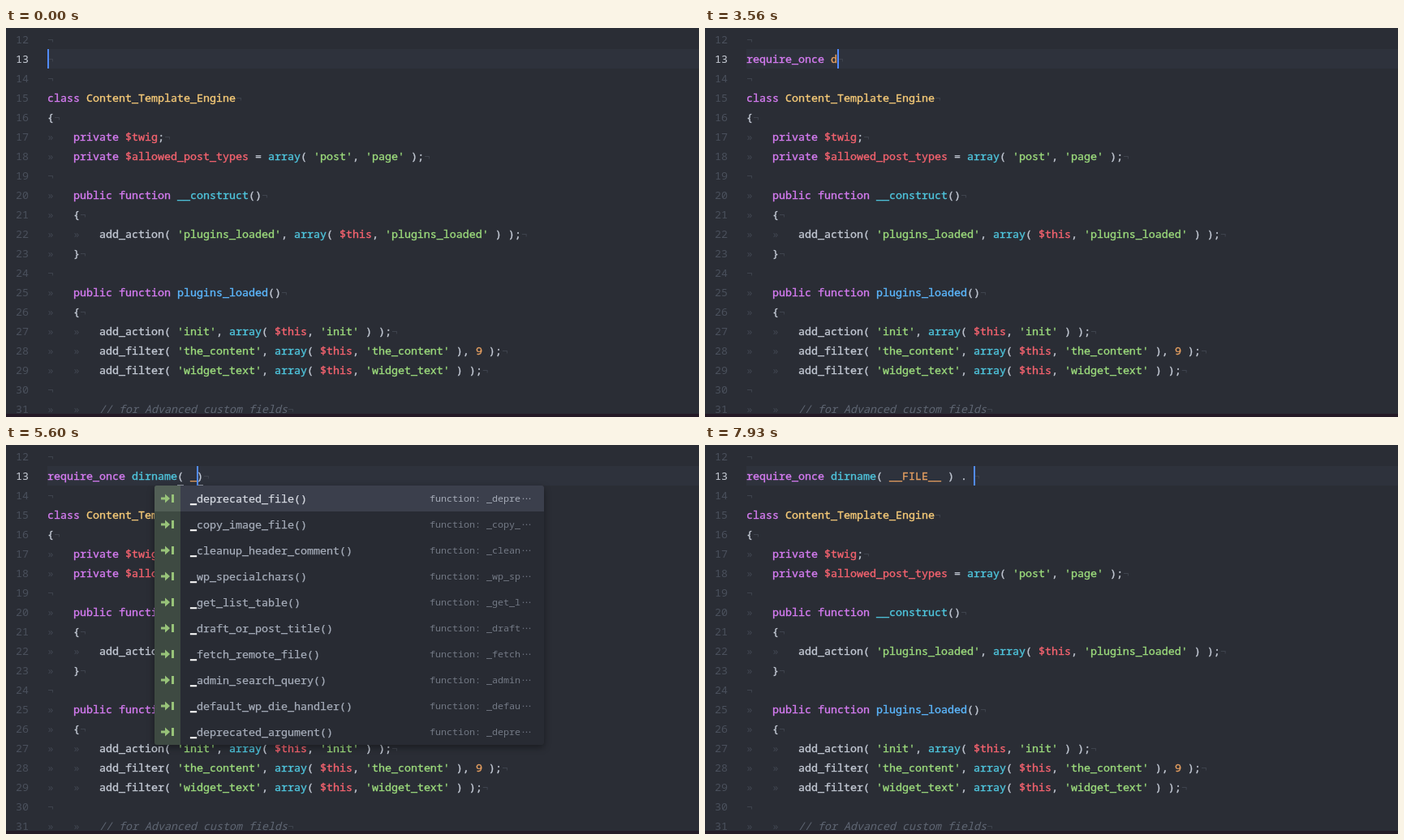
An HTML page that plays this animation: 854x480 px, repeating every 8 s.

```html
<!DOCTYPE html>
<html lang="en">
<head>
<meta charset="utf-8">
<title>Code completion</title>
<style>
html, body { margin: 0; width: 100%; height: 100%; overflow: hidden; background: #2a2d35; }
#stage {
  position: relative; width: 854px; height: 480px; overflow: hidden;
  background: #2a2d35; color: #c3c9d4;
  font: 13.3333px/24px "Noto Sans Mono", "DejaVu Sans Mono", monospace;
  font-variant-ligatures: none; white-space: pre;
}
#stage::after { content: ""; position: absolute; left: 0; top: 476px; width: 854px; height: 4px; background: #241a26; }
.line { position: absolute; left: 51px; width: 803px; height: 24px; }
.num { position: absolute; left: -39px; color: #4a505c; }
.active { background: #2e323c; }
.active .num { color: #c8cdd6; }
.text { -webkit-text-stroke: .35px; }
.inv { color: #414651; -webkit-text-stroke: 0; }
.kw { color: #d67cf2; }
.cls { color: #f7cb78; }
.var { color: #f5636f; }
.str { color: #9cdb7c; }
.sup { color: #4fc6de; }
.fn { color: #5cb8ff; }
.con { color: #e59f61; }
.com { color: #5f6673; font-style: italic; -webkit-text-stroke: 0; }
.match { display: inline-block; height: 24px; vertical-align: top; box-sizing: border-box; border-bottom: 1px solid #8d939f; }
#caret { position: absolute; top: 26px; width: 2px; height: 24px; background: #528bff; }
#popup {
  position: absolute; top: 50px; overflow: hidden; border-radius: 3px;
  background: #282b33; box-shadow: 0 3px 8px rgba(0, 0, 0, .4); line-height: 32px;
}
.row { position: relative; height: 32px; color: #a7aebb; }
.row.sel { background: #3b3f4c; color: #d6dae2; }
.row b { color: #fff; }
.icon { position: absolute; left: 0; top: 0; width: 32px; height: 32px; background: #3e4a42; color: #98c379; text-align: center; }
.sel .icon { background: #525f56; }
.icon.word { background: #47394f; color: #c678dd; font-weight: bold; }
.icon svg { position: absolute; left: 0; top: 0; }
.name { position: absolute; left: 44px; -webkit-text-stroke: .25px; }
.kind { position: absolute; right: 17px; width: 124px; font-size: 11.6667px; color: #737985; }
.sel .kind { color: #a6acb8; }
.dots { letter-spacing: -3px; }
</style>
</head>
<body>
<div id="stage"></div>
<script>
const LOOP = 8000, CHAR = 8, LEFT = 51;
const stage = document.getElementById('stage');

const code = [
  '', '', '',
  'class Content_Template_Engine',
  '{',
  '\tprivate $twig;',
  "\tprivate $allowed_post_types = array( 'post', 'page' );",
  '',
  '\tpublic function __construct()',
  '\t{',
  "\t\tadd_action( 'plugins_loaded', array( $this, 'plugins_loaded' ) );",
  '\t}',
  '',
  '\tpublic function plugins_loaded()',
  '\t{',
  "\t\tadd_action( 'init', array( $this, 'init' ) );",
  "\t\tadd_filter( 'the_content', array( $this, 'the_content' ), 9 );",
  "\t\tadd_filter( 'widget_text', array( $this, 'widget_text' ) );",
  '',
  '\t\t// for Advanced custom fields'
];

// Text before and after the caret
const typing = [
  [0, ''], [1100, 'r'], [1260, 're'], [1430, 'req'], [1500, 'requ'],
  [1700, 'requi'], [1800, 'requir'], [1900, 'require'], [2330, 'require_'],
  [2730, 'require_o'], [2830, 'require_on'], [2900, 'require_onc'], [3000, 'require_once'],
  [3460, 'require_once '], [3560, 'require_once d'], [3730, 'require_once di'],
  [3930, 'require_once dir'], [4000, 'require_once dirn'], [4060, 'require_once dirna'],
  [4130, 'require_once dirnam'], [4200, 'require_once dirname'],
  [4760, 'require_once dirname(', ')'], [5060, 'require_once dirname( ', ')'],
  [5360, 'require_once dirname( _', ')'], [5800, 'require_once dirname( __', ')'],
  [5900, 'require_once dirname( __F', ')'], [5960, 'require_once dirname( __FI', ')'],
  [6030, 'require_once dirname( __FIL', ')'], [6130, 'require_once dirname( __FILE', ')'],
  [6600, 'require_once dirname( __FILE_', ')'], [6730, 'require_once dirname( __FILE__', ')'],
  [7000, 'require_once dirname( __FILE__ ', ')'], [7160, 'require_once dirname( __FILE__ )'],
  [7600, 'require_once dirname( __FILE__ ) '], [7830, 'require_once dirname( __FILE__ ) .'],
  [7930, 'require_once dirname( __FILE__ ) . ']
];

const split = s => s.split(' ');
const lists = {
  re: split('redirect_canonical() redirect_post() redirect_guess_404_permalink() redirect_this_site() refresh_blog_details() refresh_user_details() register_activation_hook() register_admin_color_schemes() register_column_headers() register_deactivation_hook()'),
  req: split('require_wp_db() require_if_theme_supports() require require_once _wp_http_get_object() wp_remote_request() wp_safe_remote_request() rest_preload_api_request() is_request_quoted() wp_required_field_message()'),
  require: split('require_wp_db() require_if_theme_supports() require require_once the_required_plugins() wp_required_field_message()'),
  require_: split('require_wp_db() require_if_theme_supports() require_once'),
  once: ['require_once'],
  d: split('do_action() dbDelta() did_action() do_shortcode() do_settings_fields() delete_option() default_topic_count_text() date_i18n() dynamic_sidebar() disabled()'),
  di: split('disabled() did_action() discover_pingback_server_uri() dismissed_updates() display_header() display_setup_form() dirname display_theme() display_themes() disable_formats()'),
  _: split('_deprecated_file() _copy_image_file() _cleanup_header_comment() _wp_specialchars() _get_list_table() _draft_or_post_title() _fetch_remote_file() _admin_search_query() _default_wp_die_handler() _deprecated_argument()'),
  file: split('_deprecated_file() _copy_image_file() _unzip_file_pclzip() _fetch_remote_file() _unzip_file_ziparchive() _get_template_edit_filename() _wp_filter_taxonomy_base() _wp_filter_build_unique_id() _wp_preview_terms_filter() _wp_credits_add_profile_link()')
};

// time, list, query, word start, right edge
const popups = [
  [0],
  [1130, 're', 'r', 51, 484], [1300, 're', 're', 51, 484],
  [1460, 'req', 'req', 51, 463], [1730, 'req', 'requi', 51, 463],
  [1830, 'require', 'requir', 51, 463], [1930, 'require', 'require', 51, 463],
  [2460, 'require_', 'require_', 51, 420], [2760, 'once', 'require_o', 51, 420],
  [2860, 'once', 'require_on', 51, 420], [2930, 'once', 'require_onc', 51, 420], [3060],
  [3730, 'd', 'd', 155, 591], [3760, 'di', 'di', 155, 591], [4030],
  [5400, '_', '_', 227, 663], [5830, 'file', '__', 227, 748],
  [5930, 'file', '__f', 227, 748], [6000, 'file', '__fi', 227, 748],
  [6060, 'file', '__fil', 227, 748], [6160, 'file', '__file', 227, 748], [6830]
];

const hidden = [[100, 300], [500, 700], [900, 1100], [2130, 2330], [3300, 3460], [4360, 4560], [6400, 6600], [7430, 7600]];

const span = (cls, s) => `<span class="${cls}">${s}</span>`;
const eol = span('inv', '¬');

const rules = [
  ['com', /^\/\/.*/],
  ['str', /^'[^']*'/],
  ['var', /^\$\w+/],
  ['kw', /^(class|private|public|function)\b/],
  ['cls', /^Content_\w+/],
  ['sup', /^(array|__construct)\b/],
  ['fn', /^plugins_loaded\b/],
  ['con', /^\d+/],
  ['', /^(\w+|\W)/]
];
const liveRules = [
  ['kw', /^require(_once)?\b/],
  ['sup', /^dirname(?=\()/],
  ['con', /^\w+/],
  ['', /^\W/]
];

function paint(s, set) {
  let out = '';
  while (s) {
    const [cls, re] = set.find(r => r[1].test(s));
    const tok = s.match(re)[0];
    out += cls ? span(cls, tok) : tok;
    s = s.slice(tok.length);
  }
  return out;
}

stage.innerHTML = code.map((src, i) => {
  const tabs = src.match(/^\t*/)[0].length;
  const body = span('inv', '»   ').repeat(tabs) + paint(src.slice(tabs), rules) + eol;
  return `<div class="line${i === 1 ? ' active' : ''}" style="top:${2 + 24 * i}px">` +
    `<span class="num">${12 + i}</span><span class="text">${body}</span></div>`;
}).join('') + '<div id="caret"></div><div id="popup"></div>';

const live = stage.querySelector('.active .text');
const caret = document.getElementById('caret');
const popup = document.getElementById('popup');

const arrow = '<svg width="32" height="32" fill="#98c379"><path d="M8 14.5h5v-4l6 5.5-6 5.5v-4H8zM21 11h3v10h-3z"/></svg>';

// Bold each letter that matches the query in order
function embolden(name, query) {
  let k = 0;
  return [...name].map(c => c === query[k] ? (k++, `<b>${c}</b>`) : c).join('');
}

function row(name, i, query) {
  const isFn = name.endsWith(')');
  const icon = isFn ? `<span class="icon">${arrow}</span>` : '<span class="icon word">b</span>';
  const kind = isFn ? `<span class="kind">function: ${name.slice(0, 6)}<span class="dots">···</span></span>` : '';
  return `<div class="row${i ? '' : ' sel'}">${icon}<span class="name">${embolden(name, query)}</span>${kind}</div>`;
}

function drawLine([, before, after = ''], matched) {
  let html = paint(before + after, liveRules);
  if (matched) html = html.replace(/[()]/g, c => span('match', c));
  live.innerHTML = html + eol;
  caret.style.left = LEFT + CHAR * before.length + 'px';
}

function drawPopup([, list, query, x, right]) {
  popup.style.display = list ? 'block' : 'none';
  if (!list) return;
  popup.style.left = x - 44 + 'px';
  popup.style.width = right - x + 44 + 'px';
  popup.innerHTML = lists[list].map((n, i) => row(n, i, query)).join('');
}

const at = (track, t) => track.filter(e => e[0] <= t).pop();
let shownText, shownPopup;

function frame(now) {
  const t = (now - start + LOOP) % LOOP;
  const text = at(typing, t), pop = at(popups, t);
  if (text !== shownText) drawLine(shownText = text, t >= 4760 && t < 7600);
  if (pop !== shownPopup) drawPopup(shownPopup = pop);
  caret.style.visibility = hidden.some(([a, b]) => t >= a && t < b) ? 'hidden' : 'visible';
  requestAnimationFrame(frame);
}

const start = performance.now();
frame(start);
</script>
</body>
</html>
```
